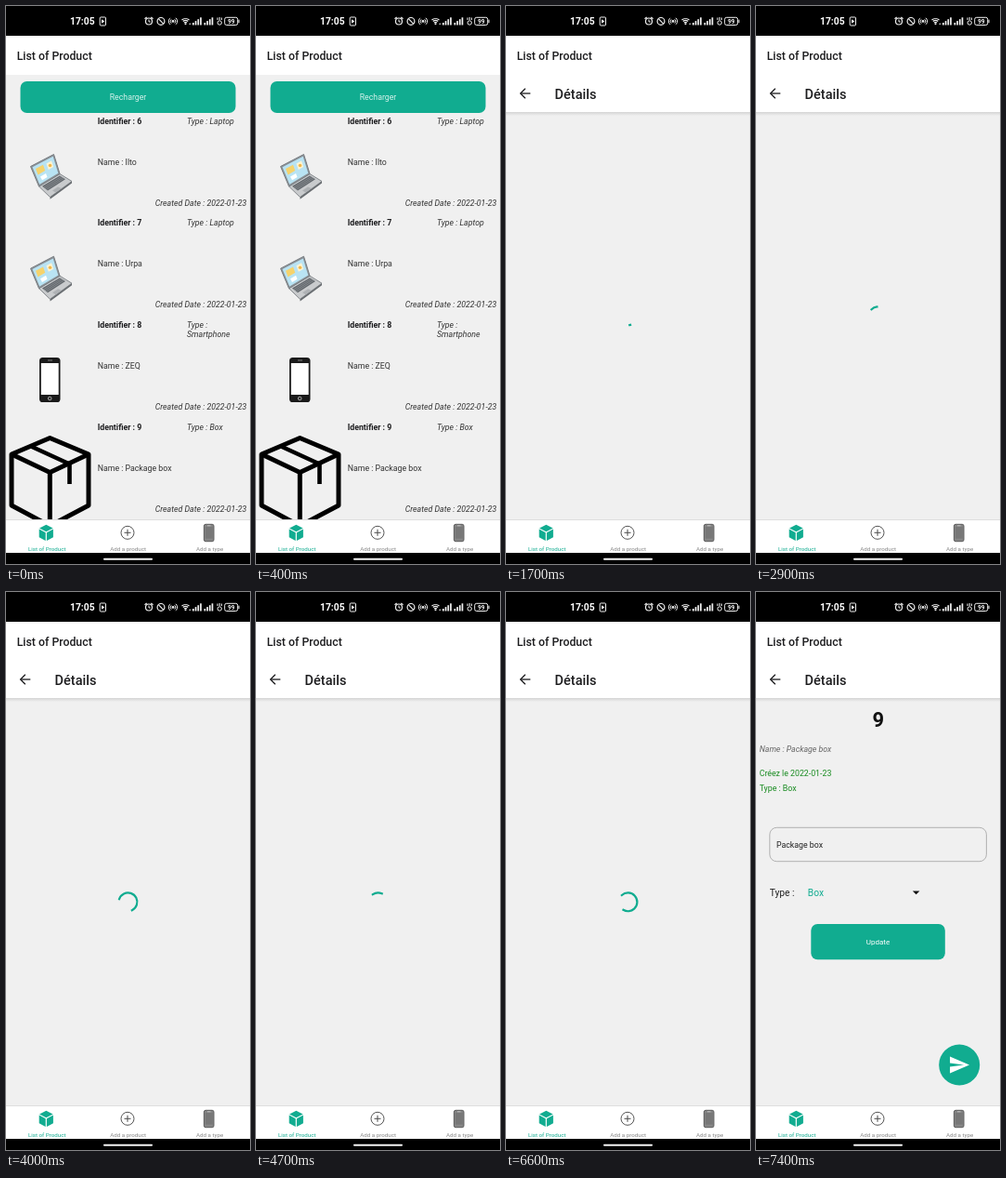
An HTML page with a canvas for the animation above (8000 ms loop, 263x600 px).

```html
<!DOCTYPE html>
<html lang="en">
<head>
<meta charset="utf-8">
<title>Product list</title>
<style>
html, body { margin: 0; width: 100%; height: 100%; overflow: hidden; background: #000; }
canvas { display: block; width: 263px; height: 600px; }
</style>
</head>
<body>
<canvas id="stage"></canvas>
<script>
const W = 263, H = 600, LOOP = 8000, STEP = 100;
const TEAL = '#11ac90', BG = '#f0f0f0', INK = '#1c1c1e';
const OPEN = 530, LOADED = 7400;
const MID = { x: 131.5, y: 313 };

const canvas = document.getElementById('stage');
const c = canvas.getContext('2d');
const dpr = window.devicePixelRatio || 1;
canvas.width = W * dpr;
canvas.height = H * dpr;

const clamp = v => Math.max(0, Math.min(1, v));
const mix = (a, b, k) => a + (b - a) * k;
const easeOut = k => k * (2 - k);
const easeInOut = k => k * k * (3 - 2 * k);

// Cubic curve y(x), solved by bisection
function curve(x, x0, y0, x1, y1, x2, y2, x3, y3) {
  const at = (s, a, b, d, e) => {
    const r = 1 - s;
    return r * r * r * a + 3 * r * r * s * b + 3 * r * s * s * d + s * s * s * e;
  };
  let lo = 0, hi = 1;
  for (let i = 0; i < 24; i++) {
    const m = (lo + hi) / 2;
    if (at(m, x0, x1, x2, x3) < x) lo = m; else hi = m;
  }
  return at(lo, y0, y1, y2, y3);
}
const slowIn = x => x < 1 / 6
  ? curve(x, 0, 0, .05, 0, .1333, .06, .1667, .4)
  : curve(x, .1667, .4, .2083, .82, .25, 1, 1, 1);
const trimHead = x => x < .5
  ? curve(x, 0, 0, .2, 0, .1, 1, .5, .96)
  : curve(x, .5, .96, .966, .965, .993, 1, 1, 1);
const trimTail = x => x < .5 ? 0 : curve(x, .5, 0, .7, 0, .6, 1, 1, 1);

function rect(x, y, w, h, color) {
  c.fillStyle = color;
  c.fillRect(x, y, w, h);
}
function round(x, y, w, h, r, fill, stroke, lw = 1) {
  c.beginPath();
  c.roundRect(x, y, w, h, r);
  paint(fill, stroke, lw);
}
function circle(x, y, r, fill, stroke, lw = 1) {
  c.beginPath();
  c.arc(x, y, r, 0, 7);
  paint(fill, stroke, lw);
}
function poly(pts, fill, stroke, lw = 1, open) {
  c.beginPath();
  for (let i = 0; i < pts.length; i += 2) c.lineTo(pts[i], pts[i + 1]);
  if (!open) c.closePath();
  paint(fill, stroke, lw);
}
function line(pts, color, lw) { poly(pts, null, color, lw, true); }
function arc(x, y, r, a, b, color, lw) {
  c.beginPath();
  c.arc(x, y, r, a, b);
  paint(null, color, lw);
}
function paint(fill, stroke, lw) {
  if (fill) { c.fillStyle = fill; c.fill(); }
  if (stroke) { c.strokeStyle = stroke; c.lineWidth = lw; c.stroke(); }
}
// y is the middle of the capitals
function text(s, x, y, size, color = INK, style = '', align = 'left') {
  c.font = `${style} ${size}px Roboto, sans-serif`;
  c.textAlign = align;
  c.fillStyle = color;
  c.fillText(s, x, y + size * .355);
}
function zoomed(k, alpha, draw) {
  c.save();
  c.globalAlpha = alpha;
  c.translate(MID.x, MID.y);
  c.scale(k, k);
  c.translate(-MID.x, -MID.y);
  draw();
  c.restore();
}

function statusBar() {
  const w = '#f2f2f2';
  rect(0, 0, W, 32, '#000');
  text('17:05', 69, 16.5, 10.3, '#fff', 'bold');
  round(101.2, 12, 6.3, 9, 1, null, w, 1);
  poly([103, 14.3, 106.3, 16.5, 103, 18.7], w);
  circle(154, 16.5, 3.5, null, w, 1.2);
  line([154, 14.5, 154, 17, 155.7, 17], w, 1);
  line([149.5, 13.8, 151.7, 12], w, 1.1);
  line([158.5, 13.8, 156.3, 12], w, 1.1);
  circle(167, 16.4, 3.9, null, w, 1.2);
  line([164.3, 13.7, 169.7, 19.1], w, 1.2);
  circle(180, 16.4, 1.3, w);
  for (const r of [2.7, 4.6]) {
    arc(180, 16.4, r, -.9, .9, w, 1);
    arc(180, 16.4, r, Math.PI - .9, Math.PI + .9, w, 1);
  }
  for (const r of [2, 4, 6]) arc(193.5, 19.5, r, -2.3, -.84, w, 1.2);
  circle(193.5, 19.3, 1, w);
  circle(198.2, 19.3, .8, w);
  for (const x of [201, 213.5])
    for (let i = 0; i < 4; i++) rect(x + i * 2.7, 18 - i * 1.9, 1.7, 2.5 + i * 1.9, w);
  circle(230.2, 18, 2.2, null, w, 1);
  line([228, 12.5, 228, 15], w, 1);
  line([230.2, 12, 230.2, 15], w, 1);
  line([232.4, 12.5, 232.4, 15], w, 1);
  round(235.7, 12.3, 14, 8.2, 2, null, w, 1);
  rect(250.4, 14.7, 1.1, 3.4, w);
  text('99', 242.7, 16.5, 6.6, w, 'bold', 'center');
}

function tabBar() {
  rect(0, 552, W, 36, '#fff');
  rect(0, 552, W, 1, '#dedede');
  poly([43.3, 557.8, 50.6, 561.4, 43.3, 565.2, 36, 561.4], TEAL);
  poly([35.7, 562.6, 42.7, 566.3, 42.7, 575, 35.7, 571.2], TEAL);
  poly([50.9, 562.6, 43.9, 566.3, 43.9, 575, 50.9, 571.2], TEAL);
  circle(131, 566.3, 7, null, '#555', 1);
  line([127.5, 566.3, 134.5, 566.3], '#555', 1.1);
  line([131, 562.8, 131, 569.8], '#555', 1.1);
  round(213.4, 557.3, 10.6, 18.4, 1.8, '#858585', '#5a5a5a', 1);
  rect(214.8, 560, 7.8, 12.6, '#777');
  line([217, 558.8, 220.5, 558.8], '#ddd', .7);
  text('List of Product', 44.2, 584, 6.2, TEAL, '', 'center');
  text('Add a product', 131.6, 584, 6.2, '#858585', '', 'center');
  text('Add a type', 219.6, 584, 6.2, '#858585', '', 'center');
  rect(0, 588, W, 12, '#000');
  round(105, 593.8, 53, 2, 1, '#f4f4f4');
}

function laptop(y) {
  c.save();
  c.translate(0, y);
  c.lineJoin = 'round';
  poly([35.5, 33, 58, 19.5, 71, 27.5, 47.5, 44.5], '#c9cbcd', '#85898d', 1);
  poly([47.5, 44.5, 71, 27.5, 71, 29.5, 47.5, 46.8], '#686c70');
  poly([39, 32.8, 58, 21.5, 64, 25.2, 45, 37.5], '#62676c');
  for (let i = 1; i < 4; i++)
    line([39 + i * 1.5, 32.8 + i * 1.2, 58 + i * 1.5, 21.5 + i * .95], '#a5a9ac', .5);
  poly([50, 37.5, 56, 33.5, 60, 35, 53.5, 39.5], '#aeb1b4');
  poly([26.5, 11.5, 51.5, -1.5, 58, 19.5, 35.5, 33], '#8d9398', '#777d82', 1);
  poly([28.5, 12.3, 50.7, .8, 56.3, 18.8, 36.2, 30.8], '#b9e3f3');
  poly([32, 14, 40, 9.8, 42.2, 16, 34.5, 20.5], '#f6d36c');
  poly([43.5, 8.5, 49, 5.5, 51.2, 12, 45.8, 15], '#fff4d2');
  poly([37, 22.5, 43, 19, 44.5, 23, 39, 26.3], '#fff');
  circle(47.5, 10.5, 1.8, '#f1b94d');
  c.restore();
}

function phone() {
  round(36, 378, 22.5, 48, 3.6, '#1b1b1b');
  rect(37.8, 384, 18.9, 34, '#fff');
  line([45, 381, 50, 381], '#999', .8);
  circle(47.2, 422, 1.8, null, '#ccc', .8);
}

function parcel() {
  c.lineJoin = 'round';
  poly([47.3, 464.5, 89, 482, 89, 537, 47.3, 559, 6, 537, 6, 482], null, '#000', 5);
  line([6, 482, 47.3, 501.5, 89, 482], '#000', 5);
  line([47.3, 501.5, 47.3, 559], '#000', 5);
  line([27, 473.5, 68.5, 492.5, 68.5, 514], '#000', 4.6);
}

const items = [
  { id: 6, type: ['Type : Laptop'], name: 'Ilto', art: () => laptop(161) },
  { id: 7, type: ['Type : Laptop'], name: 'Urpa', art: () => laptop(270.7) },
  { id: 8, type: ['Type :', 'Smartphone'], name: 'ZEQ', art: phone },
  { id: 9, type: ['Type : Box'], name: 'Package box', art: parcel }
];

function list(t) {
  const press = t < 200
    ? mix(1, .2, easeInOut(clamp((t - 50) / 150)))
    : mix(.2, 1, easeInOut(clamp((t - 200) / 200)));
  const base = c.globalAlpha;
  rect(0, 74, W, 478, BG);
  round(15.5, 81, 232, 34, 7, TEAL);
  text('Recharger', 131.5, 98, 8.77, '#d5f2eb', '', 'center');
  items.forEach((it, i) => {
    const y = 123.6 + i * 109.7;
    c.globalAlpha = i === 3 ? base * press : base;
    it.art();
    text('Identifier : ' + it.id, 98.7, y, 8.77, INK, 'bold');
    it.type.forEach((s, k) => text(s, 195, y + k * 10.3, 8.77, '#333', 'italic'));
    text('Name : ' + it.name, 98.7, y + 44, 8.77, '#333');
    text('Created Date : 2022-01-23', 259.3, y + 88, 8.77, '#333', 'italic', 'right');
  });
  c.globalAlpha = base;
}

function spinner(t) {
  const age = t - OPEN - 8;
  if (age < 0) return;
  const u = age % 1333 / 1333;
  const turn = u * .25 + age / 2222 - .25;
  const a = (turn + .75 * trimTail(u)) * 2 * Math.PI;
  const b = (turn + .75 * trimHead(u)) * 2 * Math.PI;
  c.lineCap = 'square';
  arc(131.5, 333.3, 9.9, a, b, TEAL, 2.2);
  c.lineCap = 'butt';
}

function product() {
  const green = '#168a1e';
  text('9', 131.7, 137.3, 21.9, '#111', 'bold', 'center');
  text('Name : Package box', 3.7, 168.6, 8.77, '#666', 'italic');
  text('Créez le 2022-01-23', 3.7, 195.2, 8.77, green);
  text('Type : Box', 3.7, 211.2, 8.77, green);
  round(14.8, 253.3, 233.6, 36.4, 7.5, null, '#aaa', .9);
  text('Package box', 22, 271.8, 8.77, '#222');
  text('Type :', 14.8, 323.5, 10.23, '#222');
  text('Box', 55.8, 323.5, 10.23, TEAL);
  poly([168.8, 321.4, 176.4, 321.4, 172.6, 325.2], '#111');
  round(59.3, 357, 144.5, 38.3, 7, TEAL);
  text('Update', 131.5, 376.3, 8.04, '#fff', '', 'center');
  circle(219.2, 508.5, 22, TEAL);
  c.save();
  c.translate(207, 496.5);
  poly([2, 21, 23, 12, 2, 3, 2, 10, 17, 12, 2, 14], '#fff');
  c.restore();
}

function details(t) {
  rect(0, 74, W, 478, BG);
  const g = c.createLinearGradient(0, 114, 0, 118);
  g.addColorStop(0, '#d4d4d4');
  g.addColorStop(1, BG);
  rect(0, 114, W, 4, g);
  rect(0, 74, W, 40, '#fff');
  line([26.3, 94, 15.8, 94], INK, 1.3);
  line([20.8, 88.8, 15.6, 94, 20.8, 99.2], INK, 1.3);
  text('Détails', 52.6, 94.4, 14.5, INK, '500');
  if (t < LOADED) spinner(t); else product();
}

function draw(t) {
  c.setTransform(dpr, 0, 0, dpr, 0, 0);
  c.globalAlpha = 1;
  rect(0, 32, W, 42, '#fff');
  rect(0, 74, W, 478, BG);

  const age = t - OPEN;
  const p = age > 0 ? slowIn(clamp(age / 450)) : 0;
  const shown = clamp((age - 50) / 83);
  c.save();
  c.beginPath();
  c.rect(0, 74, W, 478);
  c.clip();
  if (shown < 1) zoomed(1 + .15 * p, 1 - shown * .6, () => list(t));
  if (shown > 0) zoomed(mix(.85, 1, p), shown, () => details(t));
  c.restore();

  text('List of Product', 11.7, 53.2, 12.3, INK, '500');
  statusBar();
  tabBar();
}

function frame(now) {
  const t = now % LOOP;
  draw(Math.floor(t / STEP) * STEP);
  requestAnimationFrame(frame);
}
requestAnimationFrame(frame);
</script>
</body>
</html>
```
